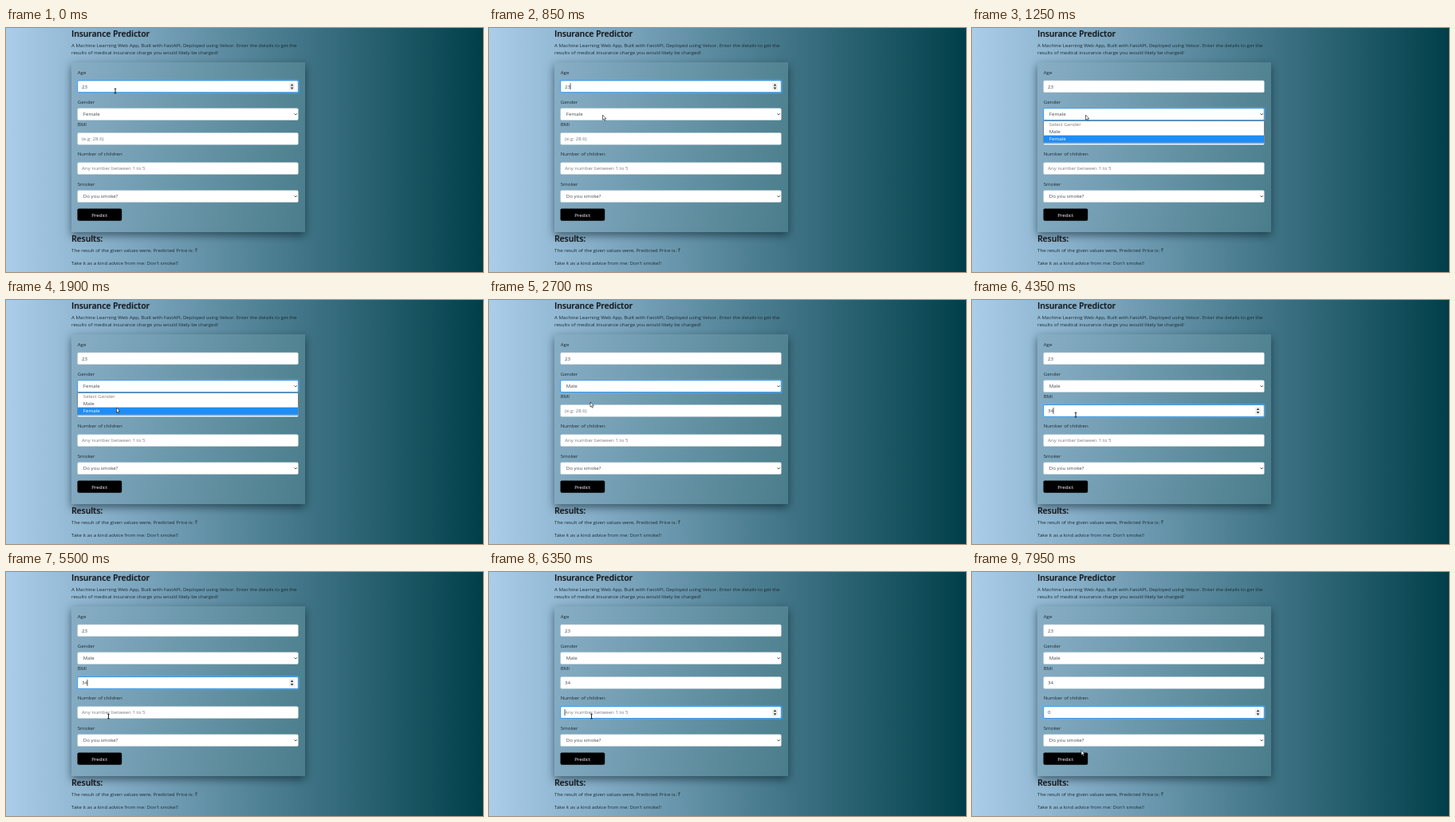
An HTML page that plays this animation: 598 by 306 pixels, repeating every 8 s.

```html
<!DOCTYPE html>
<html lang="en">
<head>
<meta charset="utf-8">
<title>Insurance Predictor</title>
<style>
html, body { margin: 0; width: 100%; height: 100%; overflow: hidden; }
body { position: relative; background: linear-gradient(to right, #abcdea, #003f4a); }
#panel {
  position: absolute; left: 82px; top: 43px; width: 293px; height: 213px;
  background: linear-gradient(100deg, #88aec6, #4a7d8b);
  box-shadow: 0 4px 10px rgba(0, 20, 30, .55);
}
svg { position: absolute; left: 0; top: 0; }
text { font: 6.16px "Open Sans", "Noto Sans", sans-serif; fill: #1d2b33; white-space: pre; }
.head { font-size: 10.36px; font-weight: 600; fill: #14181c; text-shadow: .5px .7px 1px rgba(0, 0, 0, .4); }
.value { fill: #40474e; }
.hint { fill: #747b82; }
.white { fill: #fff; }
</style>
</head>
<body>
<div id="panel"></div>
<svg id="stage" width="598" height="306" viewBox="0 0 598 306"></svg>
<script>
const stage = document.getElementById("stage");
const LOOP = 8000, STEP = 50;
const OPEN = 1100, PICK = 2500, BMI = 3050, KIDS = 5900;
const TOP = { age: 65.7, gender: 100.5, bmi: 131.3, kids: 168.5, smoker: 203.5 };

// Pointer stops: time, x, y
const path = [
  [0, 137, 79], [200, 137, 79], [700, 142.5, 109], [1400, 142.5, 109],
  [1800, 138.5, 135], [2050, 138.5, 135], [2350, 127, 128], [2750, 127, 128],
  [3000, 130, 144], [5000, 130, 144], [5500, 128.5, 181], [7300, 128.5, 181],
  [7450, 150, 212], [7700, 137, 223.5], [LOOP, 137, 223.5]
];
const caretOn = [[500, OPEN], [BMI, 3900], [4350, 4850], [5350, 5850], [KIDS, 6450], [6900, 7400]];

const text = (x, y, s, cls = "") => `<text x="${x}" y="${y}" class="${cls}">${s}</text>`;
const rect = (x, y, w, h, fill, extra = "") =>
  `<rect x="${x}" y="${y}" width="${w}" height="${h}" fill="${fill}" ${extra}/>`;
const line = (d, color, width) =>
  `<path d="${d}" fill="none" stroke="${color}" stroke-width="${width}"/>`;

function box(y, focused) {
  const ring = focused ? rect(89.3, y - .2, 277.4, 15.6, "none", 'rx="2" stroke="#66b4f5" stroke-opacity=".45" stroke-width="2.2"') : "";
  const edge = focused ? "#3b96e4" : "#c8d3da";
  return ring + rect(89.7, y + .2, 276.6, 14.8, "#fff", `rx="1.5" stroke="${edge}" stroke-width="${focused ? 1 : .5}"`);
}

function input(y, value, hint, focused) {
  const spin = focused
    ? rect(355, y + 3, 7, 9.5, "#eee") +
      `<path d="M356.7 ${y + 6.7}l1.8-2.4 1.8 2.4zM356.7 ${y + 8.8}l1.8 2.4 1.8-2.4z" fill="#333"/>`
    : "";
  return box(y, focused) + spin + text(95, y + 9.9, value || hint, value ? "value" : "hint");
}

function select(y, value, focused) {
  return box(y, focused) + text(96.8, y + 9.9, value, "value") +
    line(`M361.6 ${y + 6.8}l1.6 1.7 1.6-1.7`, "#333", .9);
}

function menu(hover) {
  const rows = ["Select Gender", "Male", "Female"];
  return rect(89.7, 116.3, 276.6, 28, "#fff", 'stroke="#53616a" stroke-width=".7"') +
    rows.map((s, i) => {
      const on = i === hover;
      return (on ? rect(90, 116.4 + i * 9.1, 276, 9.2, "#1e8cf5") : "") +
        text(96.8, 123.2 + i * 9.1, s, on ? "white" : i ? "value" : "hint");
    }).join("");
}

function pointer(t) {
  const i = path.findIndex(p => p[0] > t);
  const [t0, x0, y0] = path[i - 1], [t1, x1, y1] = path[i];
  const u = (t - t0) / (t1 - t0), e = u * u * (3 - 2 * u);
  return [x0 + (x1 - x0) * e, y0 + (y1 - y0) * e];
}

function cursor(x, y, beam) {
  return `<g transform="translate(${x} ${y})">` + (beam
    ? line("M-1.3-2.8H1.3M0-2.8V2.8M-1.3 2.8H1.3", "#111", .9)
    : '<path d="M0 0V6.2L1.4 5 2.4 7.2 3.4 6.7 2.5 4.6H4.3Z" fill="#fff" stroke="#111" stroke-width=".6"/>') + "</g>";
}

const page =
  text(82, 10.7, "Insurance Predictor", "head") +
  text(82, 23.6, "A Machine Learning Web App, Built with FastAPI, Deployed using Velsor. Enter the details to get the") +
  text(82, 33, "results of medical insurance charge you would likely be charged!") +
  text(89.7, 57.8, "Age") + text(89.7, 94.8, "Gender") + text(89.7, 123.3, "BMI") +
  text(89.7, 160.4, "Number of children") + text(89.7, 197.6, "Smoker") +
  rect(89.5, 226.5, 55.7, 15.2, "#000", 'rx="1.8"') + text(107.2, 236.7, "Predict", "white") +
  text(82, 267.7, "Results:", "head") +
  text(82, 280.6, "The result of the given values were, Predicted Price is: ₹") +
  text(82, 296.7, "Take it as a kind advice from me: Don't smoke!!");

function draw(t) {
  const [x, y] = pointer(t);
  const focus = t < OPEN ? "age" : t < BMI ? "gender" : t < KIDS ? "bmi" : "kids";
  const open = t >= OPEN && t < PICK;
  const bmi = "34".slice(0, t < 3450 ? 0 : t < 3650 ? 1 : 2);
  const kids = t < 6900 ? "" : "0";
  const typed = { age: "23", bmi, kids }[focus];
  const caret = caretOn.some(([a, b]) => t >= a && t < b) && typed !== undefined;
  const beam = !open && ["age", "bmi", "kids"].some(k => y >= TOP[k] && y <= TOP[k] + 15);
  const caretX = 95 + typed?.length * 3.52;

  stage.innerHTML = page +
    input(TOP.age, "23", "", focus === "age") +
    select(TOP.gender, t < PICK ? "Female" : "Male", focus === "gender") +
    input(TOP.bmi, bmi, "(e.g: 28.6)", focus === "bmi") +
    input(TOP.kids, kids, "Any number between 1 to 5", focus === "kids") +
    select(TOP.smoker, "Do you smoke?", false) +
    (open ? menu(t > 1900 && y < 134.5 ? 1 : 2) : "") +
    (caret ? line(`M${caretX} ${TOP[focus] + 3.6}v8`, "#111", .7) : "") +
    cursor(x, y, beam);
}

function tick(now) {
  const t = now % LOOP;
  draw(t - t % STEP);
  requestAnimationFrame(tick);
}
draw(0);
requestAnimationFrame(tick);
</script>
</body>
</html>
```
